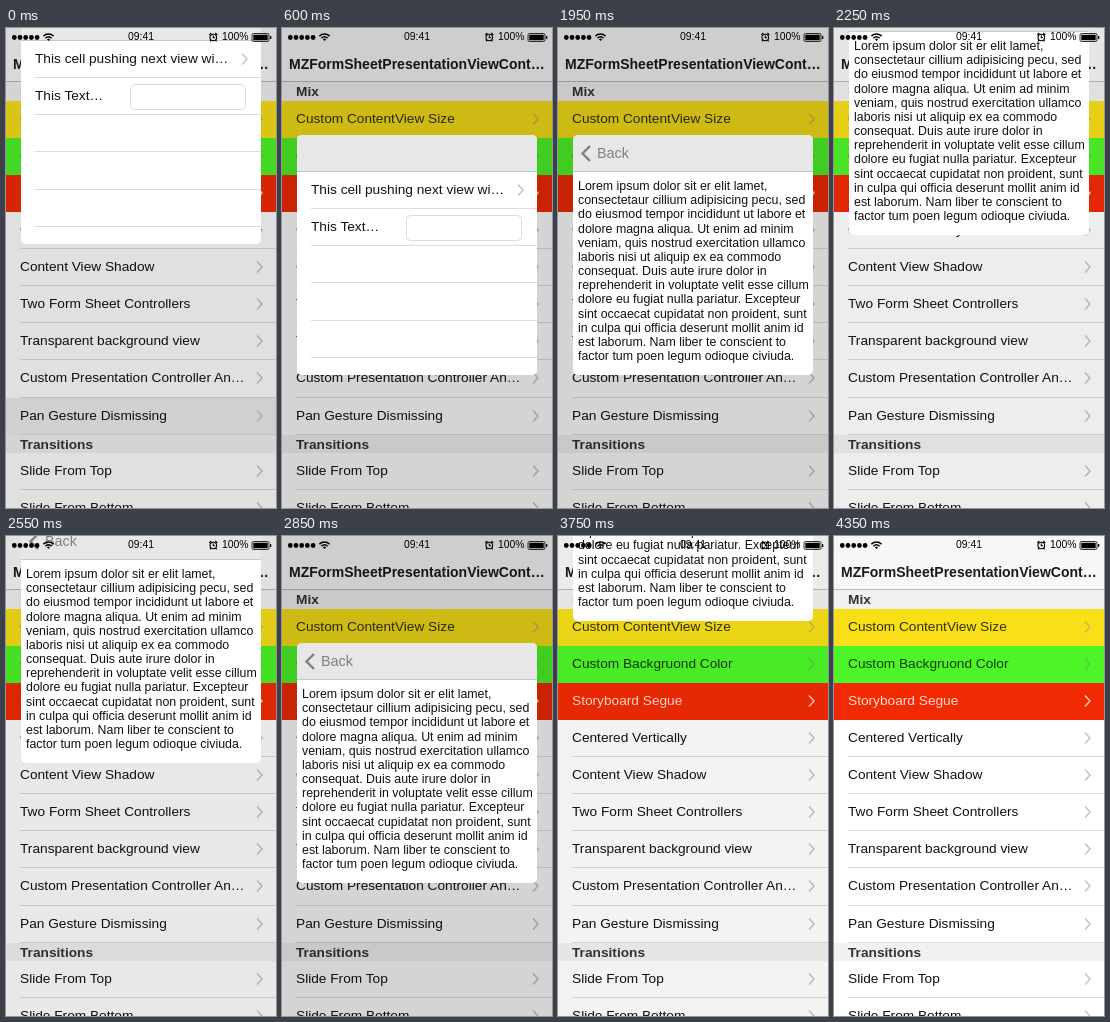
Animation, 270 px wide and 480 px high, one loop 4.5 s. Source, as an HTML page:

```html
<!DOCTYPE html>
<html lang="en">
<head>
<meta charset="utf-8">
<style>
html, body { margin: 0; width: 100%; height: 100%; overflow: hidden; }
body { position: relative; background: #fff; color: #111; font: 13.7px "Liberation Sans", Arial, sans-serif; }
div, svg { position: absolute; left: 0; top: 0; white-space: nowrap; box-sizing: border-box; }
svg { overflow: visible; fill: none; }
#stage { width: 270px; height: 480px; overflow: hidden; background: #fff; }
#bar { width: 270px; height: 54px; background: #f7f7f7; border-bottom: 1px solid #b9b9bb; }
#title { left: 7px; top: 26px; line-height: 20px; font-size: 14px; font-weight: bold; color: #1a1a1a; }
.head { width: 270px; height: 18.6px; padding-left: 14px; line-height: 19px; background: #f1f1f1; font-weight: bold; color: #333; }
.row { width: 270px; height: 37.125px; padding-left: 14px; line-height: 35.5px; }
.row::after, .cell::after { content: ""; position: absolute; left: 14px; right: 0; bottom: 0; height: 1px; background: #dcdcde; }
.tint::after { display: none; }
#dim, #shade { width: 100%; height: 100%; background: #000; }
#sheet { left: 15px; top: 107px; width: 240px; height: 240px; border-radius: 5px; overflow: hidden; background: #fff; }
#nav { width: 240px; height: 37px; background: #e7e7e7; border-bottom: 1px solid #c8c8c8; }
#back { left: 24px; line-height: 37px; font-size: 14.4px; color: #808080; }
#table, #page { top: 37px; width: 240px; height: 203px; background: #fff; }
.cell { width: 240px; height: 37.125px; padding-left: 14px; line-height: 36px; }
#field { left: 109px; top: 43px; width: 116px; height: 26px; border: 1px solid #dcdcdc; border-radius: 5px; }
#page { padding: 7px 0 0 5px; white-space: pre; font-size: 12.4px; line-height: 14.17px; box-shadow: 0 0 4px rgba(0,0,0,.25); }
#status { width: 270px; height: 18px; font-size: 10.4px; line-height: 18px; color: #000; }
</style>
</head>
<body>
<div id="stage">
  <div id="list"></div>
  <div id="bar"><div id="title">MZFormSheetPresentationViewCont…</div></div>
  <div id="dim"></div>
  <div id="sheet">
    <div id="table"><div id="cells"></div><div id="field"></div><div id="shade"></div></div>
    <div id="page">Lorem ipsum dolor sit er elit lamet,
consectetaur cillium adipisicing pecu, sed
do eiusmod tempor incididunt ut labore et
dolore magna aliqua. Ut enim ad minim
veniam, quis nostrud exercitation ullamco
laboris nisi ut aliquip ex ea commodo
consequat. Duis aute irure dolor in
reprehenderit in voluptate velit esse cillum
dolore eu fugiat nulla pariatur. Excepteur
sint occaecat cupidatat non proident, sunt
in culpa qui officia deserunt mollit anim id
est laborum. Nam liber te conscient to
factor tum poen legum odioque civiuda.</div>
    <div id="nav">
      <svg id="arrow" width="20" height="37"><path d="M17 11 9.5 18.5 17 26" stroke="#808080" stroke-width="2.4"/></svg>
      <div id="back">Back</div>
    </div>
  </div>
  <div id="status">
    <svg width="270" height="18">
      <path d="M8.3 9.5H32" stroke="#000" stroke-width="4.8" stroke-linecap="round" stroke-dasharray="0 5.7"/>
      <g stroke="#000" stroke-width="1.5">
        <path d="M37.4 8.1a7.4 7.4 0 0 1 10.2 0M39.4 10.2a4.6 4.6 0 0 1 6.2 0"/>
        <path d="M41 11.4 42.5 13 44 11.4a2 2 0 0 0-3 0z" fill="#000" stroke="none"/>
        <g stroke-width="1.1"><circle cx="207.3" cy="9.5" r="3.3"/><path d="M207.3 7.5v2.2h1.8M203.3 7l2-2M211.3 7l-2-2M205 12l-1 1.3M209.6 12l1 1.3"/></g>
        <rect x="246" y="5.5" width="17" height="8" rx="1.5" stroke-width=".8"/>
      </g>
      <path d="M247.3 6.8h14.4v5.4h-14.4zM264 8h1.3v3H264z" fill="#000"/>
    </svg>
    <div style="left:122px">09:41</div>
    <div style="left:216px">100%</div>
  </div>
</div>
<script>
const $ = id => document.getElementById(id);
const ROW = 37.125, HEAD = 18.56, LOOP = 4500, STEP = 150;

function add(parent, cls, top, text, style = {}) {
  const el = document.createElement("div");
  el.className = cls;
  el.textContent = text;
  Object.assign(el.style, { top: top + "px" }, style);
  return parent.appendChild(el);
}

function chevron(el, x, color = "#c3c3c8") {
  el.insertAdjacentHTML("beforeend", `<svg style="left:${x}px" width="8" height="37">
    <path d="M1 12.5 6 18 1 23.5" stroke="${color}" stroke-width="1.5"/></svg>`);
}

let y = 54;
function head(text) {
  add($("list"), "head", y, text);
  y += HEAD;
}
function row(text, background, color, mark) {
  const el = add($("list"), background ? "row tint" : "row", y, text, background && { background, color });
  chevron(el, 250, mark);
  y += ROW;
  return el;
}

head("Mix");
row("Custom ContentView Size", "#f8df18", "#353010", "#cfb848");
row("Custom Backgruond Color", "#4df528", "#123c0c", "#55c944");
row("Storyboard Segue", "#f22a04", "#ffd9d0", "#ffc8be");
["Centered Vertically", "Content View Shadow", "Two Form Sheet Controllers",
  "Transparent background view", "Custom Presentation Controller An…"].forEach(s => row(s));
const picked = row("Pan Gesture Dismissing");
head("Transitions");
row("Slide From Top");
row("Slide From Bottom");

const cells = ["This cell pushing next view wi…", "This Text…", "", "", ""]
  .map((s, i) => add($("cells"), "cell", i * ROW, s));
chevron(cells[0], 220);

// Linear interpolation between [time, value] keys
function track(t, keys) {
  const i = keys.findIndex(k => k[0] > t);
  if (i < 0) return keys[keys.length - 1][1];
  if (i === 0) return keys[0][1];
  const [t0, a] = keys[i - 1], [t1, b] = keys[i];
  return a + (b - a) * (t - t0) / (t1 - t0);
}

const lift = [[0, 131], [150, 38], [300, 5], [450, 0],
  [1950, 0], [2100, 62], [2250, 140], [2400, 168], [2550, 120], [2700, 28], [2850, 0],
  [3000, 0], [3150, 14], [3300, 52], [3450, 104], [3600, 170], [3750, 262], [3900, 350]];
const dim = [[0, .12], [300, .17], [1950, .17], [2250, .07], [2400, .05], [2850, .17],
  [3000, .17], [3450, .14], [3900, 0]];
const glow = [[0, .07], [300, .07], [600, 0]];

function draw(now) {
  const t = Math.floor(now % LOOP / STEP) * STEP;
  $("sheet").style.transform = `translateY(${-track(t, lift)}px)`;
  $("dim").style.opacity = track(t, dim);
  picked.style.background = `rgba(0,0,0,${track(t, glow)})`;

  const p = Math.min(1, Math.max(0, (t - 1000) / 400));
  const push = 1 - (1 - p) ** 3, rest = 1 - push;
  $("table").style.transform = `translateX(${-72 * push}px)`;
  $("page").style.transform = `translateX(${204 * rest}px)`;
  $("page").style.visibility = p ? "visible" : "hidden";
  $("shade").style.opacity = .1 * push;
  cells[0].style.background = t >= 900 ? "#d9d9d9" : "";
  $("back").style.transform = `translateX(${58 * rest}px)`;
  $("back").style.opacity = push ** 3;
  $("arrow").style.opacity = push ** 12;
  requestAnimationFrame(draw);
}
requestAnimationFrame(draw);
</script>
</body>
</html>
```
